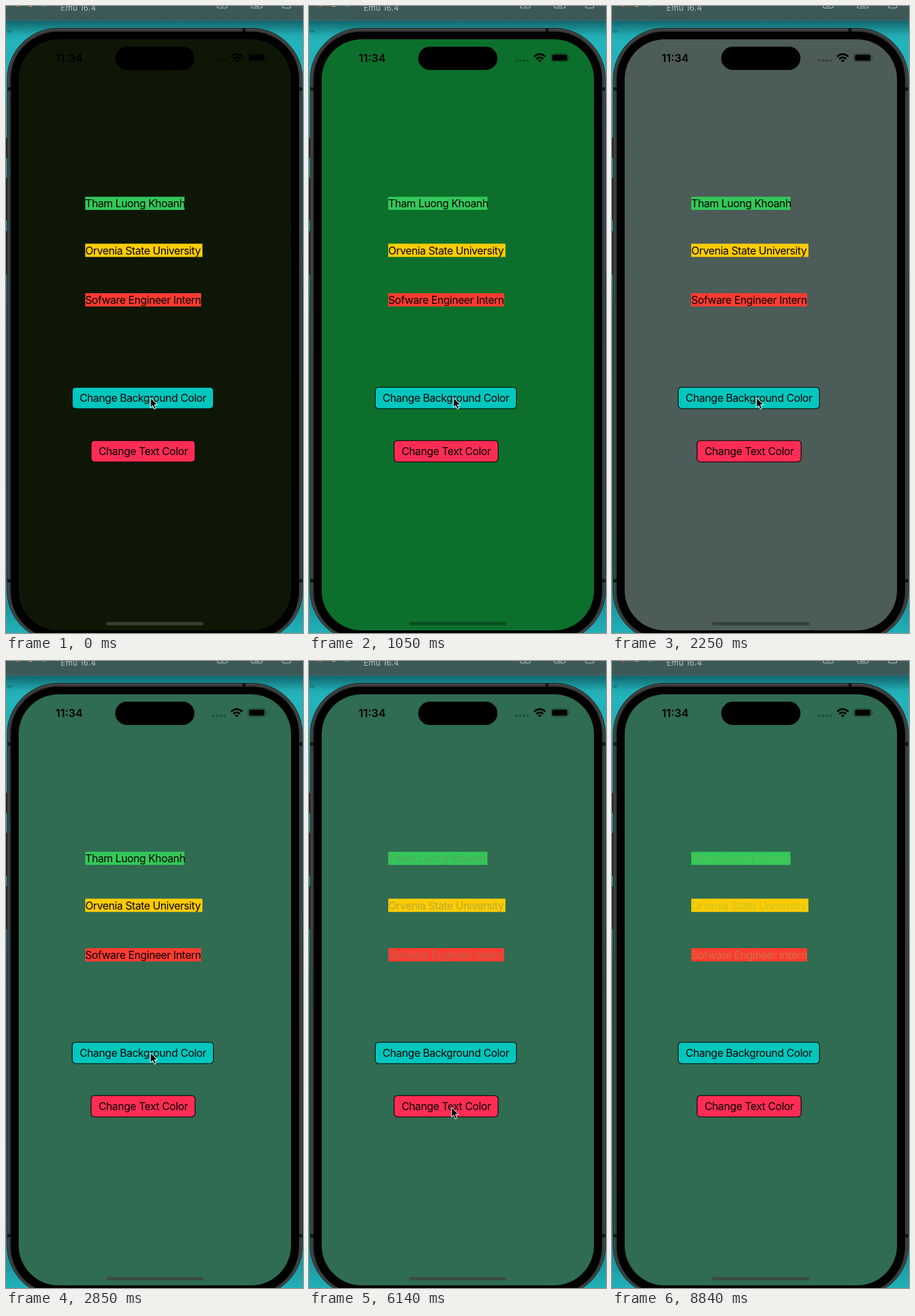
Animation, 446 px wide and 941 px high, one loop 9290 ms. Source, as an HTML page:

```html
<!DOCTYPE html>
<html lang="en">
<head>
<meta charset="utf-8">
<title>Color changer</title>
<style>
  html, body { margin: 0; width: 100%; height: 100%; overflow: hidden; background: #1fa5ad; }
  svg { display: block; width: 446px; height: 941px; }
  text { font: 16px Inter, "Liberation Sans", sans-serif; letter-spacing: -.025em; }
  .clock { font-size: 16.5px; font-weight: 600; letter-spacing: 0; }
  .version { font-size: 12px; letter-spacing: .02em; fill: #b4c3c2; }
  .icon { fill: none; stroke: #b4c3c2; stroke-width: 1.2; }
</style>
</head>
<body>
<svg viewBox="0 0 446 941">
  <defs>
    <linearGradient id="wall" x2="0" y2="1">
      <stop offset="0" stop-color="#1b8c94"/>
      <stop offset=".06" stop-color="#24b4bb"/>
      <stop offset=".4" stop-color="#1a949c"/>
      <stop offset=".5" stop-color="#14646c"/>
      <stop offset=".9" stop-color="#15747c"/>
      <stop offset="1" stop-color="#22b0b8"/>
    </linearGradient>
    <linearGradient id="shade" x2="0" y2="1">
      <stop offset="0" stop-color="#0b4b50" stop-opacity=".65"/>
      <stop offset="1" stop-color="#0b4b50" stop-opacity="0"/>
    </linearGradient>
  </defs>

  <!-- desktop and window bar -->
  <rect width="446" height="941" fill="url(#wall)"/>
  <rect y="22" width="446" height="22" fill="url(#shade)"/>
  <g fill="#126d74" opacity=".6">
    <ellipse cx="14" cy="26" rx="8" ry="2"/>
    <ellipse cx="46" cy="25" rx="13" ry="2.5"/>
    <ellipse cx="5" cy="38" rx="4" ry="2"/>
  </g>
  <rect width="446" height="22" fill="#3c5958"/>
  <path d="M0 21.5H446" stroke="#55706f" stroke-opacity=".7"/>
  <circle cx="17" cy="-5" r="6" fill="#ff5f57"/>
  <circle cx="37" cy="-5" r="6" fill="#febc2e"/>
  <circle cx="57" cy="-5" r="6" fill="#28c840"/>
  <text class="version" x="82" y="7">Emu 16.4</text>
  <g class="icon">
    <path d="M317.500-3V1.500Q317.500 3 319 3H330.500Q332 3 332 1.500V-3M322-1Q324.700 1.500 327.500-1"/>
    <path d="M368.500-3V1.500Q368.500 3 370 3H383Q384.500 3 384.500 1.500V-3M373 .3H380"/>
    <path d="M415.500-3V1.500Q415.500 3 417 3H426Q427.500 3 427.500 1.500V-3"/>
  </g>

  <!-- phone -->
  <path d="M.5 198V228M.5 258V322M.5 338V403" stroke="#2a2c2c" stroke-width="3"/>
  <rect x="2" y="33.500" width="443" height="920" rx="76" fill="#383a3a" stroke="#171919"/>
  <rect x="3.200" y="34.700" width="440.600" height="918" rx="75" fill="none" stroke="#565858" stroke-width=".9"/>
  <path d="M2 124.500H8M439 124.500H445M2 862.500H8M439 862.500H445M357.500 33.500V39" stroke="#141515" stroke-width="5"/>
  <rect x="7" y="38.500" width="433" height="911" rx="71" fill="#000"/>
  <rect id="screen" x="19" y="50" width="409" height="887" rx="60"/>
  <rect x="164" y="61" width="119" height="35" rx="17.500"/>

  <!-- status bar -->
  <text class="clock" x="74.500" y="84">11:34</text>
  <g fill-opacity=".28">
    <circle cx="311.500" cy="82" r="2"/><circle cx="317" cy="82" r="2"/>
    <circle cx="322.500" cy="82" r="2"/><circle cx="328" cy="82" r="2"/>
  </g>
  <g fill="none" stroke="#000" stroke-width="2.500">
    <path d="M338 76Q346.500 68.200 355 76"/>
    <path d="M341.200 79.500Q346.500 74.800 351.800 79.500"/>
  </g>
  <path d="M343.700 81.700Q346.500 79.300 349.300 81.700L346.500 84.500Z"/>
  <rect x="363.500" y="71.500" width="26" height="12" rx="4" fill="none" stroke="#000" stroke-opacity=".42"/>
  <rect x="365" y="73" width="23" height="9" rx="2.600"/>
  <path d="M391 75.500Q393 77.500 391 79.700Z" fill-opacity=".45"/>
  <rect id="home" x="150.500" y="924.500" width="146" height="5" rx="2.500"/>

  <!-- app -->
  <rect x="119" y="286.300" width="149" height="19.700" fill="#34c759"/>
  <rect x="119" y="356.700" width="176" height="19.900" fill="#ffcc00"/>
  <rect x="119" y="431" width="174" height="19.900" fill="#ff3b30"/>
  <g id="labels">
    <text x="119" y="302">Tham Luong Khoanh</text>
    <text x="119" y="372.500">Orvenia State University</text>
    <text x="119" y="446.500">Sofware Engineer Intern</text>
  </g>
  <g stroke="#000" stroke-width="1.100">
    <rect x="99.500" y="572.200" width="212" height="32" rx="5" fill="#00c7be"/>
    <rect x="127.800" y="652.200" width="156.200" height="32" rx="5" fill="#ff2d55"/>
  </g>
  <text x="110.500" y="594.200">Change Background Color</text>
  <text x="139" y="674.200">Change Text Color</text>
  <path id="cursor" d="M1 1V15.500L4.300 12.500L6.700 18L9.300 16.900L7 11.500H11.500Z" stroke="#fff" stroke-linejoin="round"/>
</svg>
<script>
  const LOOP = 9290;
  const get = id => document.getElementById(id);
  const screen = get('screen'), home = get('home'), labels = get('labels'), cursor = get('cursor');

  // Each track lists [start time, value]; a value holds until the next one.
  const screenColors = [
    [0, '#0e1706'], [450, '#46554a'], [1050, '#0c702c'],
    [1650, '#54484f'], [2250, '#4c5c58'], [2850, '#2f6c52']
  ];
  const homeColors = [[0, 'rgb(58 63 52)'], [450, 'rgb(0 0 0 / .3)'], [2850, 'rgb(61 75 67)']];
  const textColors = [
    [0, '#000'],
    [3900, 'rgb(110 110 90 / .5)'], [4350, 'rgb(150 130 90 / .5)'],
    [4940, 'rgb(222 224 130 / .5)'], [5540, 'rgb(130 130 100 / .5)'],
    [6140, 'rgb(110 140 110 / .5)'], [6590, 'rgb(130 100 90 / .5)'],
    [7190, 'rgb(82 70 65 / .55)'], [7640, 'rgb(110 130 90 / .5)'],
    [8090, 'rgb(135 188 88 / .45)']
  ];
  const cursorSpots = [
    [0, [216, 587]], [3000, [216, 592]], [3150, [211, 656]], [3300, [213, 669]],
    [8240, [370, 827]], [8390, [384, 882]], [8540, [367, 909]],
    [8690, [364, 931]], [8840, [364, 960]]
  ];

  const valueAt = (track, time) => track.findLast(([start]) => start <= time)[1];

  function draw(time) {
    screen.setAttribute('fill', valueAt(screenColors, time));
    home.setAttribute('fill', valueAt(homeColors, time));
    labels.setAttribute('fill', valueAt(textColors, time));
    cursor.setAttribute('transform', `translate(${valueAt(cursorSpots, time)})`);
  }

  const origin = performance.now();
  function tick() {
    draw((performance.now() - origin) % LOOP);
    requestAnimationFrame(tick);
  }
  tick();
</script>
</body>
</html>
```
